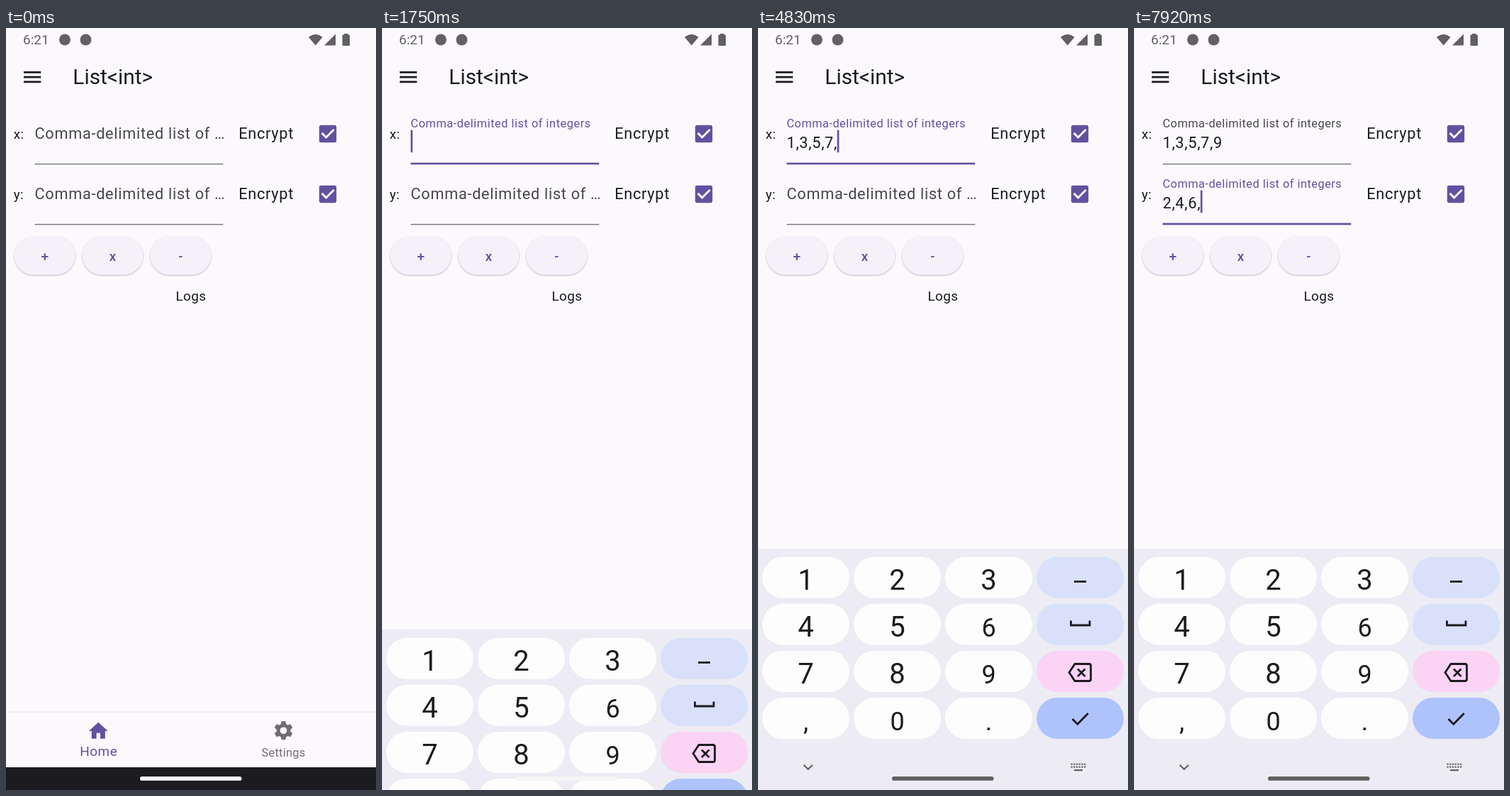
These frames come from a looping animation (522x1073 px, 8000 ms). An HTML page:

```html
<!DOCTYPE html>
<html lang="en">
<head>
<meta charset="utf-8">
<title>List form</title>
<style>
  html, body { margin: 0; width: 100%; height: 100%; overflow: hidden; background: #fcf9fd; }
  svg { display: block; width: 522px; height: 1073px; font-family: Roboto, sans-serif; fill: #1c1b1f; }
  .body { font-size: 21.75px; letter-spacing: .68px; }
  .small { font-size: 19px; letter-spacing: .34px; }
  .line { fill: none; stroke: #1c1b1f; stroke-width: 2.8; }
  .mid { text-anchor: middle; }
  .pill { filter: drop-shadow(0 1px 1px rgba(40, 30, 60, .3)); }
</style>
</head>
<body>
<svg id="stage" viewBox="0 0 522 1073">
  <g fill="#625f65">
    <text x="24" y="23" font-size="19">6:21</text>
    <circle cx="83" cy="16.5" r="8"/>
    <circle cx="112.500" cy="16.500" r="8"/>
    <path d="M427 13Q436.700 5 446.500 13L436.700 24.500Z"/>
    <path d="M465 8.500V24.500H449Z"/>
    <path d="M477 9.500V8h5.500v1.500h1.300q1.200 0 1.200 1.200v13q0 1.300-1.200 1.300h-8.100q-1.200 0-1.200-1.300v-13q0-1.200 1.200-1.200z"/>
  </g>
  <path d="M25 62.300h24.300M25 69.100h24.300M25 75.900h24.300" class="line"/>
  <text x="94.300" y="78.700" font-size="29.900">List&lt;int&gt;</text>

  <g id="form"></g>
  <text x="261" y="384" class="small mid">Logs</text>

  <g id="tabs">
    <rect y="962.500" width="522" height="1.200" fill="#f0ebf3"/>
    <path transform="translate(114 973.600) scale(1.359)" fill="#6350a0" d="M10 20v-6h4v6h5v-8h3L12 3 2 12h3v8z"/>
    <text x="130.700" y="1025" class="mid" font-size="19" letter-spacing=".5" fill="#6350a0">Home</text>
    <g id="gear" transform="translate(391.500 989.300)" fill="#706d72">
      <circle r="7.300" fill="none" stroke="#706d72" stroke-width="4.900"/>
    </g>
    <text x="391.500" y="1026" class="mid" font-size="16.300" letter-spacing=".3" fill="#706d72">Settings</text>
  </g>
  <rect y="1041" width="522" height="32"/>
  <g id="keyboard"></g>
  <rect id="handle" x="189" y="1054" width="143.500" height="5.800" rx="2.900"/>
</svg>
<script>
const LOOP = 8000;
const PURPLE = [99, 80, 160], GREY = [73, 69, 79], RULE = [121, 116, 126];
const HINT = 'Comma-delimited list of ';
const TEXT_X = 40.5, KEY_GAP = 360;
const X_TAP = 1612, Y_TAP = 5350, KEYBOARD_UP = 1670;

const $ = id => document.getElementById(id);

function add(parent, tag, attrs, text) {
  const el = document.createElementNS('http://www.w3.org/2000/svg', tag);
  set(el, attrs);
  if (text) el.textContent = text;
  return parent.appendChild(el);
}

function set(el, attrs) {
  for (const k in attrs) el.setAttribute(k, attrs[k]);
}

const clamp = v => Math.max(0, Math.min(1, v));
const mix = (a, b, p) => a + (b - a) * p;
const rgb = (a, b, p) => `rgb(${a.map((v, i) => Math.round(mix(v, b[i], p)))})`;

// CSS-style cubic bezier easing, solved by bisection
function bezier(x1, y1, x2, y2) {
  const at = (a, b, u) => 3 * a * u * (1 - u) ** 2 + 3 * b * u * u * (1 - u) + u ** 3;
  return x => {
    if (x <= 0 || x >= 1) return clamp(x);
    let lo = 0, hi = 1;
    for (let i = 0; i < 24; i++) {
      const u = (lo + hi) / 2;
      if (at(x1, x2, u) < x) lo = u; else hi = u;
    }
    return at(y1, y2, lo);
  };
}
const standard = bezier(.4, 0, .2, 1);
const emphasized = bezier(.2, 0, 0, 1);

function makeField(name, y, focus, blur, firstKey, value) {
  const g = add($('form'), 'g', { transform: `translate(0 ${y})` });
  add(g, 'text', { x: 10.700, y: 156, class: 'small' }, name + ':');
  add(g, 'text', { x: 328.300, y: 156, class: 'body' }, 'Encrypt');
  add(g, 'rect', { x: 441.800, y: 136.800, width: 24.400, height: 24.400, rx: 2.700, fill: '#6350a0' });
  add(g, 'path', { d: 'M445.500 147.800l6.100 6.100 11-11', class: 'line', style: 'stroke:#fff' });
  return {
    focus, blur, firstKey, value,
    label: add(g, 'text', { class: 'body' }),
    text: add(g, 'text', { x: TEXT_X, y: 169, class: 'body' }),
    rule: add(g, 'rect', { x: TEXT_X, width: 265.800 }),
    caret: add(g, 'rect', { y: 143.700, width: 2.700, height: 31.500, fill: '#6350a0' })
  };
}

function drawField(f, t) {
  const up = standard(clamp((t - f.focus) / 167));
  const active = up - clamp((t - f.blur) / 167);
  set(f.label, {
    transform: `translate(${TEXT_X} ${mix(156, 139.500, up)}) scale(${mix(1, .75, up)})`,
    fill: rgb(GREY, PURPLE, active)
  });
  f.label.textContent = HINT + (up > .77 ? 'integers' : '…');

  const typed = Math.max(0, Math.min(f.value.length, Math.floor((t - f.firstKey) / KEY_GAP) + 1));
  f.text.textContent = f.value.slice(0, typed);
  const h = mix(1.4, 2.7, active);
  set(f.rule, { y: 192.300 - h, height: h, fill: rgb(RULE, PURPLE, active) });

  const since = t - (typed ? f.firstKey + (typed - 1) * KEY_GAP : f.focus);
  const shown = t >= f.focus && t < f.blur && since % 1000 < 500;
  set(f.caret, {
    x: TEXT_X + (typed ? f.text.getComputedTextLength() - .3 : 0),
    visibility: shown ? 'visible' : 'hidden'
  });
}

function buildButtons() {
  ['+', 'x', '-'].forEach((s, i) => {
    const x = 11.700 + i * 95.800;
    add($('form'), 'rect', { x, y: 293.500, width: 86, height: 54, rx: 27, fill: '#f5f1f9', class: 'pill' });
    add($('form'), 'text', {
      x: x + 43, y: 327.500, class: 'mid', 'font-size': 19, 'font-weight': 500, fill: '#6350a0'
    }, s);
  });
}

function buildKeyboard() {
  const kb = $('keyboard');
  add(kb, 'rect', { y: 733, width: 522, height: 342, fill: '#edecf4' });
  const rows = ['123', '456', '789', ',0.'];
  const tints = ['#d8e1f9', '#d8e1f9', '#fad3f5', '#aec3fb'];
  rows.forEach((row, r) => {
    const y = 744.700 + r * 66.100;
    for (let c = 0; c < 4; c++) {
      const x = 6 + c * 129;
      add(kb, 'rect', { x, y, width: 123, height: 58, rx: 29, fill: c < 3 ? '#fdfdfd' : tints[r] });
      if (c < 3) {
        const small = '690,.'.includes(row[c]);
        add(kb, 'text', { x: x + 61.500, y: y + 46, class: 'mid', 'font-size': small ? 36 : 40 }, row[c]);
      }
    }
  });
  const icons = [
    'M446 779.500h17',
    'M441.500 834.500v6.500h26.500v-6.500',
    'M447 895.500h20q2.500 0 2.500 2.500v19q0 2.500-2.500 2.500h-20l-8-12zM451 902.500l10.500 10.500M461.500 902.500l-10.500 10.500',
    'M443.500 973l7.300 7.300 15-15.300'
  ];
  icons.forEach(d => add(kb, 'path', { d, class: 'line' }));
  add(kb, 'path', { d: 'M64.500 1037.700l6.200 6 6.200-6', class: 'line', style: 'stroke:#625f65;stroke-width:2.2' });
  for (let i = 0; i < 12; i++) {
    add(kb, 'rect', {
      x: 441.500 + (i % 6) * 3.700, y: 1035.500 + Math.floor(i / 6) * 4, width: 2.200, height: 2.200, fill: '#625f65'
    });
  }
  add(kb, 'rect', { x: 446, y: 1044, width: 12, height: 2.200, fill: '#625f65' });
}

for (let i = 0; i < 6; i++) {
  add($('gear'), 'path', { d: 'M-4.200-7L-2.900-13H2.900L4.200-7Z', transform: `rotate(${i * 60})` });
}
const fields = [
  makeField('x', 0, X_TAP, Y_TAP, 2280, '1,3,5,7,9'),
  makeField('y', 85, Y_TAP, Infinity, 6050, '2,4,6,')
];
buildButtons();
buildKeyboard();

function draw(t) {
  fields.forEach(f => drawField(f, t));
  const rise = emphasized(clamp((t - KEYBOARD_UP) / 285));
  set($('keyboard'), { transform: `translate(0 ${340 * (1 - rise)})` });
  set($('handle'), { fill: rgb([245, 245, 245], [96, 96, 96], clamp((t - 2260) / 250)) });
}

const start = performance.now();
function tick() {
  draw((performance.now() - start) % LOOP);
  requestAnimationFrame(tick);
}
tick();
</script>
</body>
</html>
```
